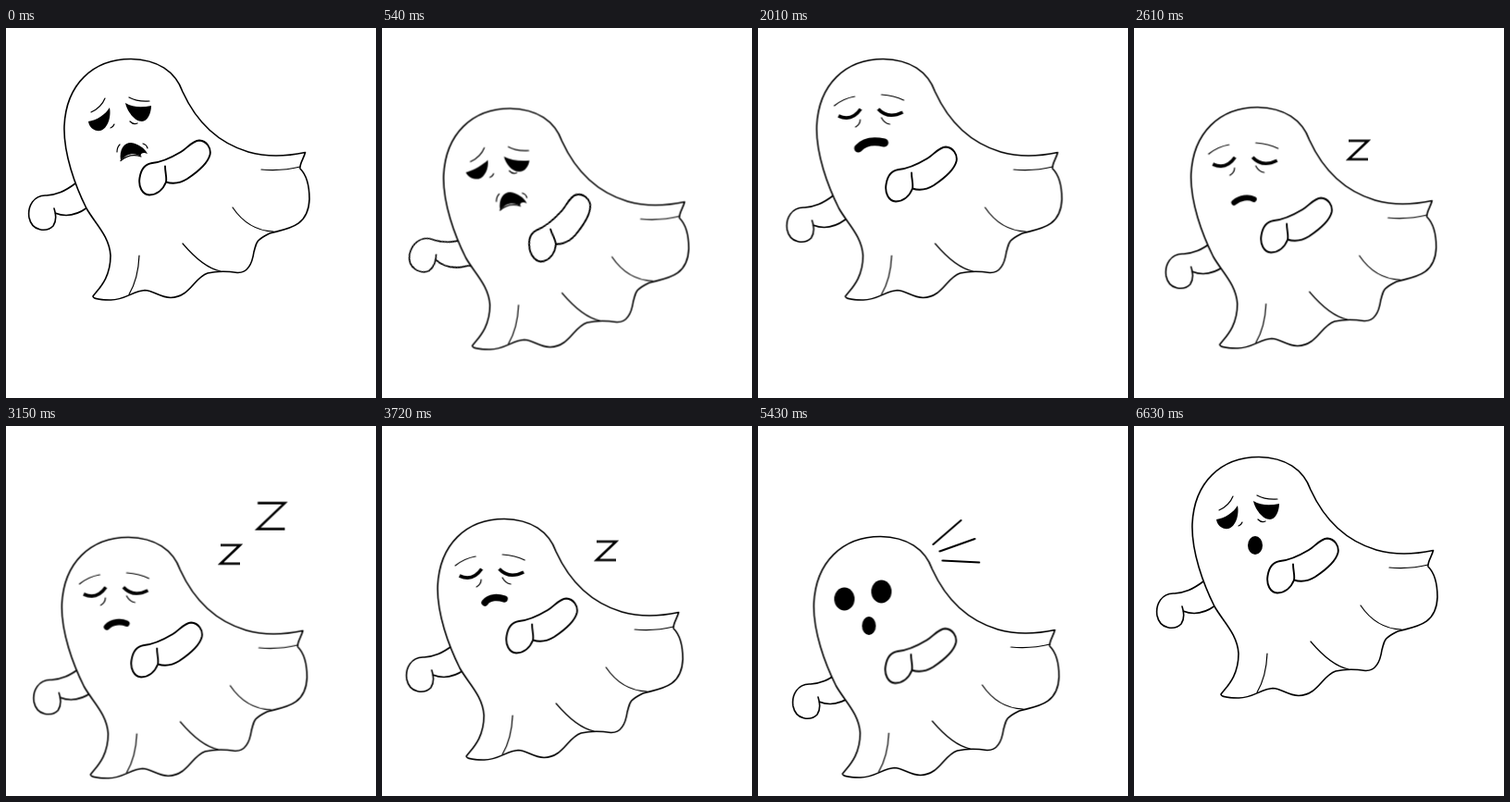
An HTML page without scripts for the animation above (6780 ms loop, 400x400 px).

```html
<!DOCTYPE html>
<html lang="en">
<head>
<meta charset="utf-8">
<title>Sleepy ghost</title>
<style>
  html, body { margin: 0; width: 100%; height: 100%; overflow: hidden; background: #fff; }
  svg { display: block; width: 100%; height: 100%; }

  .line { fill: none; stroke: #000; stroke-width: 1.6; stroke-linecap: round; stroke-linejoin: round; }
  .fine { stroke-width: 1.2; }
  .lids { stroke-width: 3.6; stroke-linecap: butt; }
  .body, .arm { fill: #fff; }
  .front { stroke-width: 1.9; }
  .rays { stroke-width: 2; }
  #z { fill: none; stroke: #000; stroke-width: 2.6; vector-effect: non-scaling-stroke; }

  .move { animation: 6780ms infinite cubic-bezier(.37, 0, .63, 1); }
  .show { animation: 6780ms infinite step-end; }

  .ghost { animation-name: bob; }
  .back { animation-name: back; transform-origin: 39px 203px; }
  .front { animation-name: front; transform-origin: 208px 135px; }
  .rays { animation-name: rays; }
  .zs { animation-name: float; }
  .eye-l { animation-name: eye-l; }
  .eye-r { animation-name: eye-r; }
  .snore { animation-name: snore; }

  .sad { animation-name: sad; }
  .brows { animation-name: brows; }
  .gasp { animation-name: gasp; }
  .frown { animation-name: frown; }
  .wobble { animation-name: wobble; }
  .asleep { animation-name: asleep; }
  .awake { animation-name: awake; }
  .z1 { animation-name: z1; }
  .z2 { animation-name: z2; }
  .z3 { animation-name: z3; }

  @keyframes bob {
    0% { transform: translate(0, 0); animation-timing-function: cubic-bezier(.4, 0, .75, .85); }
    12.61% { transform: translate(6.5px, 97px); animation-timing-function: cubic-bezier(.4, .2, .7, .7); }
    15.93% { transform: translate(4px, 72px); animation-timing-function: linear; }
    20.58% { transform: translate(2.5px, 45px); animation-timing-function: cubic-bezier(.3, .3, .6, 1); }
    26% { transform: translate(.5px, -7px); animation-timing-function: cubic-bezier(.4, 0, .8, .7); }
    29.65% { transform: translate(.5px, 0); animation-timing-function: cubic-bezier(.35, .25, .65, 1); }
    47.2% { transform: translate(-2.6px, 87px); }
    57.23% { transform: translate(-2.8px, 64px); }
    70.35%, 86.28% { transform: translate(-2.6px, 86px); }
    93.81%, 100% { transform: translate(0, 0); }
  }
  @keyframes back {
    0%, 93.81%, 100% { transform: translate(0, 0) rotate(0deg); }
    15.93% { transform: translate(2px, -17px) rotate(42deg); }
    29.65% { transform: translate(6px, 13px) rotate(0deg); }
    38.5% { transform: translate(11px, 11px) rotate(0deg); }
    54.87% { transform: translate(4.5px, 2px) rotate(0deg); }
    70.35%, 86.28% { transform: translate(15.5px, 12px) rotate(0deg); }
  }
  @keyframes front {
    0%, 93.81%, 100% { transform: translate(0, 0) rotate(0deg); }
    15.93% { transform: translate(2px, 10px) rotate(-33deg); }
    29.65% { transform: translate(-6.5px, 7px) rotate(0deg); }
    38.5% { transform: translate(-5.5px, 10px) rotate(0deg); }
    54.87% { transform: translate(-7px, -2px) rotate(0deg); }
    70.35%, 86.28% { transform: translate(-4px, 11.5px) rotate(0deg); }
  }
  @keyframes rays {
    0%, 86.28% { transform: translate(0, 0); }
    93.81%, 100% { transform: translate(-1px, -5px); }
  }
  @keyframes float {
    0%, 26% { transform: translate(0, 0); }
    38.5% { transform: translate(0, 10.4px); }
    47.2% { transform: translate(0, 17.4px); }
    57.23% { transform: translate(0, 12.8px); }
    70.35%, 100% { transform: translate(0, 17.2px); }
  }
  @keyframes eye-l {
    0%, 4%, 97%, 100% { d: path("M112 86C108 93 98 100 89 101C90 108 96 112 102 111C110 109 114 96 112 86Z"); }
    13%, 90% { d: path("M109 94C102 96 93 101 84 105C90 108 95 108 99 108C105 106 109 100 109 94Z"); }
  }
  @keyframes eye-r {
    0%, 4%, 97%, 100% { d: path("M129 81C137 86 147 86 157 84C157 92 153 101 147 101C139 101 131 90 129 81Z"); }
    13%, 90% { d: path("M127 92C134 95 143 97 154 98C152 102 147 104 141 103C133 103 129 98 127 92Z"); }
  }
  @keyframes snore {
    0%, 29.65% { d: path("M108 130C115 122 127 122 136 124"); stroke-width: 9px; }
    38.5% { d: path("M109.5 136.5C116 131 125 130 131 133"); stroke-width: 6px; }
    54.87% { d: path("M114 124C119 117 129 118 135 120"); stroke-width: 7.5px; }
    70.35%, 100% { d: path("M109.5 136.5C116 131 125 130 131 133"); stroke-width: 6px; }
  }

  @keyframes sad { 0% { opacity: 1; } 21.39% { opacity: 0; } 97.71%, 100% { opacity: 1; } }
  @keyframes brows { 0% { opacity: 1; } 10.32% { opacity: 0; } 97.71%, 100% { opacity: 1; } }
  @keyframes gasp { 0% { opacity: 0; } 97.71%, 100% { opacity: 1; } }
  @keyframes frown { 0% { opacity: 1; } 10.32%, 100% { opacity: 0; } }
  @keyframes wobble { 0% { opacity: 0; } 10.32% { opacity: 1; } 21.39%, 100% { opacity: 0; } }
  @keyframes asleep { 0% { opacity: 0; } 21.39% { opacity: 1; } 80.01%, 100% { opacity: 0; } }
  @keyframes awake { 0% { opacity: 0; } 80.01% { opacity: 1; } 97.71%, 100% { opacity: 0; } }
  @keyframes z1 { 0%, 52.5% { opacity: 0; } 36.14%, 53.83% { opacity: 1; } 80.01%, 100% { opacity: 0; } }
  @keyframes z2 { 0%, 52.5% { opacity: 0; } 42.48%, 59% { opacity: 1; } 80.01%, 100% { opacity: 0; } }
  @keyframes z3 { 0%, 52.5% { opacity: 0; } 47.94%, 64.16% { opacity: 1; } 80.01%, 100% { opacity: 0; } }
</style>
</head>
<body>
<svg viewBox="0 0 400 400">
  <defs><path id="z" d="M0 0H21L0 20H21"/></defs>

  <g class="ghost move">
    <path class="line arm back move" d="M97 155L75 168C63 177 55 180 44 181C30 180 23 193 25 205C28 220 44 221 51 214C55 208 54 201 52 195M53 200C65 205 77 202 88 194L104 187"/>

    <path class="line body" d="M94 290C100 282 113 271 113 246C112 225 96 211 87 195C75 171 62 136 63 106C65 61 94 33.500 135 33.500C164 34 183 47 191 69C207 104 232 125 262 134C283 140 302 139 323.500 134.500C322 141 317 147 318 152C326 160 328 173 328 185C327 216 303 217 285 222C269 230 271 232 268 242C266 256 260 265 250 264.500C240 263 227 263 218 265C203 270 199 291 178 291.500C166 291 160 284 150 283.500C138 284 127 295 112 294C104 294 94 293 94 290Z"/>
    <path class="line fine" d="M276 153Q298 155 318 150M245 194Q262 219 289 220M191 233Q213 259 232 263M144 246Q143 271 133 288"/>

    <g class="sad show">
      <path class="eye-l move" d="M112 86C108 93 98 100 89 101C90 108 96 112 102 111C110 109 114 96 112 86Z"/>
      <path class="eye-r move" d="M129 81C137 86 147 86 157 84C157 92 153 101 147 101C139 101 131 90 129 81Z"/>
    </g>
    <path class="line fine brows show" d="M92 91Q103 86 107 76M133 75Q142 80 155 79M117 104Q116 107 113 108M134 101Q138 105 142 103"/>
    <ellipse class="gasp show" cx="131" cy="129" rx="8" ry="10"/>
    <g class="frown show">
      <path d="M124 143.500C122 131 128 124 135 124C143 125 150 130 153 136C146 133 145 138 146 139C138 134 130 136 124 143.500Z"/>
      <path class="line fine" d="M120 134Q120 129 123 126M148 125Q152 126 153 130M124 143.500Q134 135 146 139"/>
    </g>
    <g class="wobble show">
      <path class="line fine" d="M80 92Q93 87 98 74M129 74Q140 80 153 79M109 108Q108 112 105 113M131 105Q133 108 137 109"/>
      <path class="line" d="M109 142C109 133 108 126 111 127C115 129 119 139 122 138C126 136 123 123 126 124C130 126 131 137 134 137C138 137 136 124 139 123C143 124 143 132 144 138"/>
    </g>

    <g class="asleep show">
      <path class="line fine" d="M82 84Q92 76 104 74M133 72Q147 73 157 78M110 99Q110 104 105 107M133 97Q136 103 142 104"/>
      <path class="line lids" d="M86.500 95Q101 101.500 110.500 87.500M129.500 87.500Q140 99 156 91"/>
      <path class="line snore move" d="M108 130C115 122 127 122 136 124"/>
    </g>

    <g class="awake show">
      <ellipse cx="96" cy="101" rx="11" ry="12.500"/>
      <ellipse cx="136" cy="93" rx="11" ry="12.500"/>
      <ellipse cx="122.500" cy="130" rx="7.500" ry="10"/>
      <path class="line rays move" d="M192 42L222 16M199 49.500L237 36M202 59.500L242 61.500"/>
    </g>

    <path class="line arm front move" d="M173 166.500C170 174 164 180 155 180.500C147 180 143 171 144.500 162C146 152 151 147 158 146C168 145 179 140 189 134C196 130 201 122 209 121.500C217 122 222 130 220.500 137C218 147 205 157 196 163C188 168 181 169 173 166.500C174 161 172 156 172 149.500"/>
  </g>

  <g class="zs move">
    <g class="z1 show"><use href="#z" x="232" y="111.500"/></g>
    <g class="z2 show"><use href="#z" transform="translate(272 66) scale(1.400)"/></g>
    <g class="z3 show"><use href="#z" transform="translate(318 11.500) scale(1.830)"/></g>
  </g>
</svg>
</body>
</html>
```
